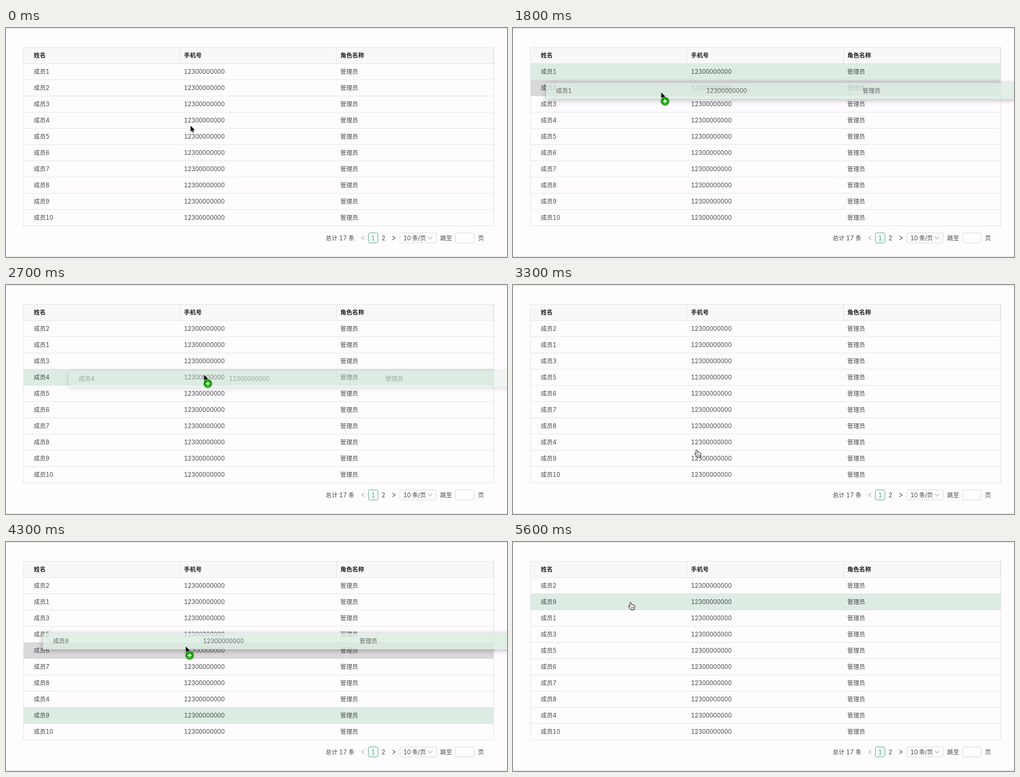
Write an HTML page that moves like this. It is 1046 px wide and 480 px high and loops after 5800 ms.

```html
<!DOCTYPE html>
<html lang="zh-CN">
<head>
<meta charset="utf-8">
<title>拖拽排序表格</title>
<style>
  html, body { margin: 0; width: 100%; height: 100%; overflow: hidden; background: #fefcff; }
  svg { display: block; }
  text {
    font: 12.4px Inter, "Noto Sans CJK SC", "Noto Sans CJK", sans-serif;
    font-variant-numeric: tabular-nums;
    fill: #464547;
    white-space: pre;
  }
  .head text { font-weight: 600; fill: #1f1e20; }
  .tight { letter-spacing: -.32px; }
  .line { fill: none; stroke: #e2e1e4; }
  .box { fill: none; stroke: #d6d5d8; }
  .ghost { filter: drop-shadow(0 2px 6px rgba(0, 0, 0, .36)); }
  .cursor { filter: drop-shadow(0 1px 1px rgba(0, 0, 0, .3)); }
</style>
</head>
<body>
<svg id="stage" width="1046" height="480" viewBox="0 0 1046 480"></svg>
<script>
const LOOP = 5800, STEP = 100, FADE = 300;
const LEFT = 37, TOP = 75, ROW = 34, WIDTH = 981, COUNT = 10;
const COLS = [58, 371.5, 698];
const GREEN = '#dcece2', GREY = '#dad8da', ACCENT = '#39a96b';
const PHONE = '12300000000', ROLE = '管理员';

// time, x, y of the pointer
const PATH = [
  [0, 385, 204], [400, 300, 61], [600, 287, 84], [900, 266, 104],
  [1200, 276, 97], [1300, 277, 94], [1400, 277, 94], [1500, 281, 98],
  [1800, 309, 134], [2000, 317, 139], [2600, 319, 184], [2700, 413, 187],
  [3200, 385, 345], [3300, 384, 346], [3700, 335, 374], [3900, 335, 374],
  [4000, 340, 379], [4300, 375, 218], [4500, 246, 127], [LOOP, 246, 127]
];
const DRAGS = [
  { from: 0, to: 1, start: 1500, end: 2000, x: 277, y: 94 },
  { from: 3, to: 7, start: 2700, end: 3300, x: 319, y: 184 },
  { from: 8, to: 1, start: 4000, end: 4500, x: 335, y: 374 }
];
const HOVERS = [
  { row: 0, start: 700, end: 1500 },
  { row: 2, start: 2100, end: 2300 },
  { row: 3, start: 2300, end: 2700 },
  { row: 8, start: 3300, end: 4000 },
  { row: 1, start: 4400, end: LOOP }
];

const stage = document.getElementById('stage');
const clamp = v => Math.max(0, Math.min(1, v));
const rowTop = i => TOP + i * ROW;

function add(parent, tag, attrs = {}, content) {
  const el = document.createElementNS('http://www.w3.org/2000/svg', tag);
  set(el, attrs);
  if (content !== undefined) el.textContent = content;
  parent.appendChild(el);
  return el;
}
function set(el, attrs) {
  for (const key in attrs) el.setAttribute(key, attrs[key]);
}
const label = (parent, x, y, content, attrs) => add(parent, 'text', { x, y, ...attrs }, content);
const path = (parent, d, attrs) => add(parent, 'path', { d, ...attrs });
const box = (x, width, attrs) =>
  add(stage, 'rect', { x, y: 429.5, width, height: 21, rx: 3, class: 'box', ...attrs });

function addCells(parent, top) {
  const y = top + 20.5;
  label(parent, COLS[1], y, PHONE, { class: 'tight' });
  label(parent, COLS[2], y, ROLE);
  return label(parent, COLS[0], y, '');
}

function buildTable() {
  add(stage, 'rect', { width: 1046, height: 480, fill: '#fefcff' });
  path(stage, 'M0 .5H1046M0 479.5H1046', { class: 'line', style: 'stroke:#d8d7da' });
  add(stage, 'rect', { x: LEFT, y: 41, width: WIDTH, height: ROW, fill: '#f8f7f9' });
  const head = add(stage, 'g', { class: 'head' });
  ['姓名', '手机号', '角色名称'].forEach((s, i) => label(head, COLS[i], 61.5, s));

  const rows = Array.from({ length: COUNT }, (_, i) => {
    const back = add(stage, 'rect', { x: LEFT, y: rowTop(i), width: WIDTH, height: ROW });
    return { back, name: addCells(stage, rowTop(i)) };
  });
  let lines = 'M36.5 40V415M1018.5 40V415M363.5 40V74M690.5 40V74M1017.5 40V74';
  for (let i = -1; i <= COUNT; i++) lines += `M36 ${rowTop(i) - .5}H1019`;
  path(stage, lines, { class: 'line' });
  return rows;
}

function buildPager() {
  const y = 444.5;
  const chevron = (d, stroke) => path(stage, d, { fill: 'none', stroke, 'stroke-width': 1.2 });
  label(stage, 667.5, y, '总计 17 条');
  chevron('M748 436L742.5 440L748 444', '#aaa9ab');
  box(756.5, 20, { style: `stroke:${ACCENT}` });
  label(stage, 766.5, y, '1', { 'text-anchor': 'middle', style: `fill:${ACCENT}` });
  label(stage, 788, y, '2', { 'text-anchor': 'middle' });
  chevron('M807 436L812.5 440L807 444', '#464547');
  box(822.5, 76);
  label(stage, 829.5, y, '10 条/页', { class: 'tight' });
  chevron('M881 437.5L885.5 442.5L890 437.5', '#b3b2b5');
  label(stage, 906.5, y, '跳至');
  box(938.5, 39);
  label(stage, 985.5, y, '页');
}

function buildGhost() {
  const g = add(stage, 'g');
  const body = add(g, 'g', { class: 'ghost' });
  add(body, 'rect', { x: LEFT, width: WIDTH, height: ROW, fill: GREEN });
  return { g, name: addCells(body, 0) };
}

function buildCursor() {
  const g = add(stage, 'g', { class: 'cursor' });
  const arrow = path(g, 'M.5 1V13.2L3.3 10.6L5.3 15.1L7.2 14.2L5.3 9.9H9.2Z',
    { fill: '#000', stroke: '#fff', 'stroke-width': 1.4, 'paint-order': 'stroke' });

  const hand = add(g, 'g', {
    transform: 'translate(-.4 -.9)', stroke: '#111', 'stroke-width': 1, 'stroke-linejoin': 'round'
  });
  path(hand, 'M-1.2 9.5L-1.5 1.6Q-1.5 .3 -.1 .3Q1.3 .3 1.4 1.6L1.9 6Q2.2 4.8 3.3 5Q4.4 5.2 4.4 6.4' +
    'Q4.8 5.4 5.8 5.7Q6.8 6 6.8 7.1Q7.3 6.4 8.1 6.7Q9 7 8.9 8.5Q8.9 11.5 7.4 13.5V15.6H.6V14.2' +
    'Q-1.5 12.2 -4.2 9.6Q-5.2 8.4 -4.3 7.7Q-3.4 7.1 -2.3 8.2Z', { fill: '#fff' });
  path(hand, 'M1.9 9.8V13M4.1 9.8V13M6.2 9.8V13', { 'stroke-width': .8 });

  const badge = add(g, 'g', { transform: 'translate(8.4 19.4)' });
  add(badge, 'circle', { r: 8.8, fill: '#1f9a12' });
  add(badge, 'ellipse', { cy: 3, rx: 6, ry: 4.6, fill: '#3fb82a', opacity: .6 });
  path(badge, 'M-4.2 0H4.2M0 -4.2V4.2', { stroke: '#fff', 'stroke-width': 2 });
  return { g, arrow, hand, badge };
}

const rows = buildTable();
buildPager();
const ghost = buildGhost();
const cursor = buildCursor();

function pointerAt(t) {
  const i = Math.max(1, PATH.findIndex(p => p[0] >= t));
  const [t0, x0, y0] = PATH[i - 1], [t1, x1, y1] = PATH[i];
  const k = (t - t0) / (t1 - t0);
  return [x0 + (x1 - x0) * k, y0 + (y1 - y0) * k];
}

function orderAt(t) {
  const list = Array.from({ length: COUNT }, (_, i) => i + 1);
  for (const d of DRAGS) if (t >= d.end) list.splice(d.to, 0, list.splice(d.from, 1)[0]);
  return list;
}

function hoverAt(row, t) {
  return Math.max(0, ...HOVERS.filter(h => h.row === row)
    .map(h => clamp((t - h.start) / FADE) * clamp(1 - (t - h.end) / FADE)));
}

const show = (el, on) => set(el, { display: on ? 'inline' : 'none' });

function draw(t) {
  const [x, y] = pointerAt(t);
  const drag = DRAGS.find(d => t >= d.start && t < d.end);
  const over = Math.floor((y - TOP) / ROW);
  const names = orderAt(t).map(n => '成员' + n);

  rows.forEach(({ back, name }, i) => {
    let fill = GREEN, alpha = drag ? 0 : hoverAt(i, t);
    if (drag && i === drag.from) alpha = 1;
    else if (drag && i === over) { fill = GREY; alpha = 1; }
    set(back, { fill, 'fill-opacity': alpha });
    name.textContent = names[i];
  });

  show(ghost.g, drag);
  if (drag) {
    ghost.name.textContent = names[drag.from];
    set(ghost.g, {
      transform: `translate(${x - drag.x} ${rowTop(drag.from) + y - drag.y})`,
      opacity: .8 * clamp(.5 + (t - drag.start) / 200)
    });
  }

  const pointing = t >= 700 && !drag;
  set(cursor.g, { transform: `translate(${x} ${y})` });
  show(cursor.hand, pointing);
  show(cursor.arrow, !pointing);
  show(cursor.badge, drag);
}

function tick() {
  const t = performance.now() % LOOP;
  draw(Math.floor(t / STEP) * STEP);
  requestAnimationFrame(tick);
}
tick();
</script>
</body>
</html>
```
